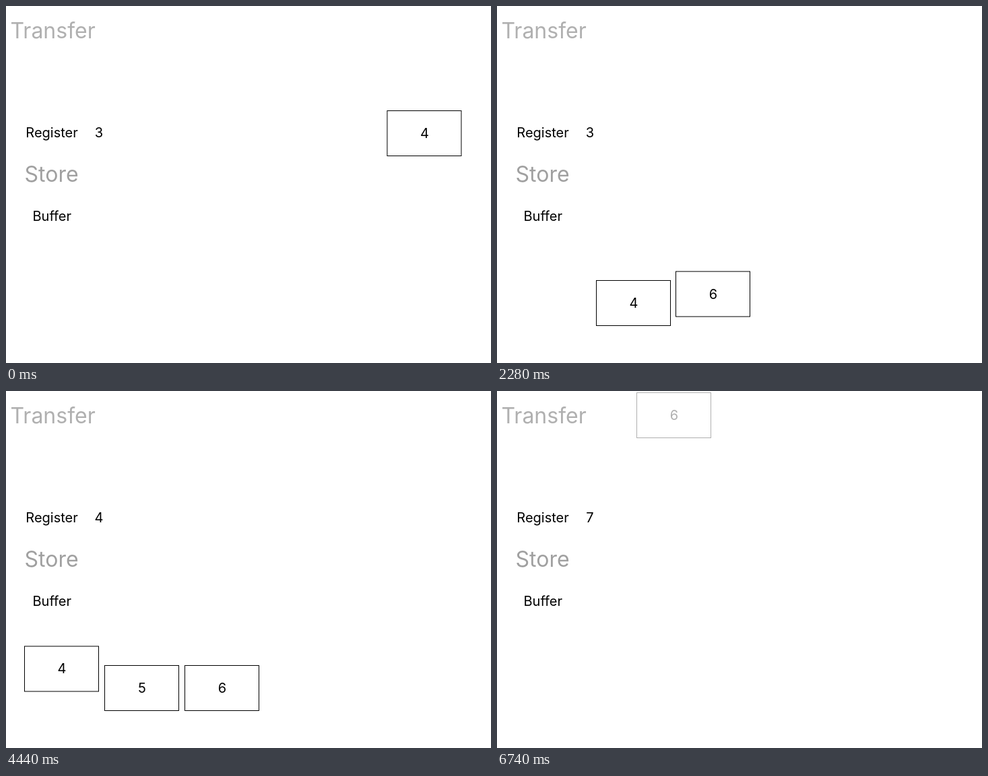
Animation, 720 px wide and 530 px high, one loop 6760 ms. Source, as an HTML page:

```html
<!DOCTYPE html>
<html lang="en">
<head>
<meta charset="utf-8">
<style>
  html, body { margin: 0; width: 100%; height: 100%; overflow: hidden; background: #fff; }
  svg { display: block; font: 20px Inter, sans-serif; }
  .title { font-size: 32px; }
  .mid { text-anchor: middle; }
  rect { fill: #fff; stroke: #000; }
</style>
</head>
<body>
<svg id="stage" width="720" height="530" viewBox="0 0 720 530">
  <text class="title" x="6.5" y="48" fill="#b0b0b0">Transfer</text>
  <text x="29.3" y="195">Register</text>
  <text class="title" x="27.5" y="261" fill="#a0a0a0">Store</text>
  <text x="39.5" y="319">Buffer</text>
  <text class="mid" id="register" x="138" y="195">3</text>
  <path id="cross" d="M166 174L196 203M196 174L166 203" stroke="#f00" stroke-width="4"/>
</svg>
<script>
const LOOP = 6760;
const $ = id => document.getElementById(id);

// Stops of the route
const ENTRY = 566, LANE = 207, TOP = 2, CHECK = 155, WAIT = 286, SHELF = 407;

// Each track is a list of [time, value] pairs, linear in between
const boxes = [
  { label: 4, from: 0, to: 5160,
    x: [[0, ENTRY], [600, LANE], [2040, LANE], [2260, 147], [3195, 147], [3475, 27], [4600, 27], [4780, LANE]],
    y: [[680, CHECK], [955, WAIT], [960, WAIT], [1160, SHELF], [4375, SHELF], [4655, WAIT], [4780, WAIT], [5040, TOP]],
    fade: [[5040, 1], [5160, 0]] },
  { label: 6, from: 1165, to: LOOP,
    x: [[1165, ENTRY], [1616, LANE], [2040, LANE], [2260, 265], [5500, 265], [5780, LANE]],
    y: [[1720, CHECK], [2000, WAIT], [2040, WAIT], [2311, SHELF], [5957, SHELF], [6237, WAIT], [6580, TOP]],
    fade: [[6580, 1], [6740, 0.31]] },
  { label: 5, from: 2400, to: 5950,
    x: [[2470, ENTRY], [2921, LANE], [3201, LANE], [3481, 146], [5160, 146], [5330, LANE]],
    y: [[2921, CHECK], [3201, WAIT], [3481, SHELF], [5207, SHELF], [5487, WAIT], [5830, TOP]],
    fade: [[5830, 1], [5950, 0]] },
  { label: 3, from: 3560, to: 4410,
    x: [[3644, ENTRY], [4095, LANE]],
    y: [[4095, CHECK], [4330, TOP]],
    fade: [[4330, 1], [4410, 0]] },
];

const counts = [[0, 3], [4330, 4], [5040, 5], [5830, 6], [6580, 7]];
const crosses = [[600, 820], [1616, 1860], [2921, 3061]];

function at(track, t) {
  const i = track.findIndex(k => k[0] > t);
  if (i < 0) return track[track.length - 1][1];
  if (i === 0) return track[0][1];
  const [t0, a] = track[i - 1], [t1, b] = track[i];
  return a + (b - a) * (t - t0) / (t1 - t0);
}

for (const box of boxes) {
  box.el = document.createElementNS("http://www.w3.org/2000/svg", "g");
  box.el.innerHTML = `<rect x=".5" y=".5" width="110" height="67"/>
    <text class="mid" x="56" y="41">${box.label}</text>`;
  $("stage").append(box.el);
}

function draw(t) {
  for (const { el, from, to, x, y, fade } of boxes) {
    el.setAttribute("visibility", t >= from && t < to ? "visible" : "hidden");
    el.setAttribute("transform", `translate(${at(x, t)} ${at(y, t)})`);
    el.setAttribute("opacity", at(fade, t));
  }
  $("register").textContent = counts.filter(c => c[0] <= t).pop()[1];
  const shown = crosses.some(([a, b]) => t >= a && t < b);
  $("cross").setAttribute("visibility", shown ? "visible" : "hidden");
}

const start = performance.now();
function tick() {
  draw((performance.now() - start) % LOOP);
  requestAnimationFrame(tick);
}
draw(0);
requestAnimationFrame(tick);
</script>
</body>
</html>
```
